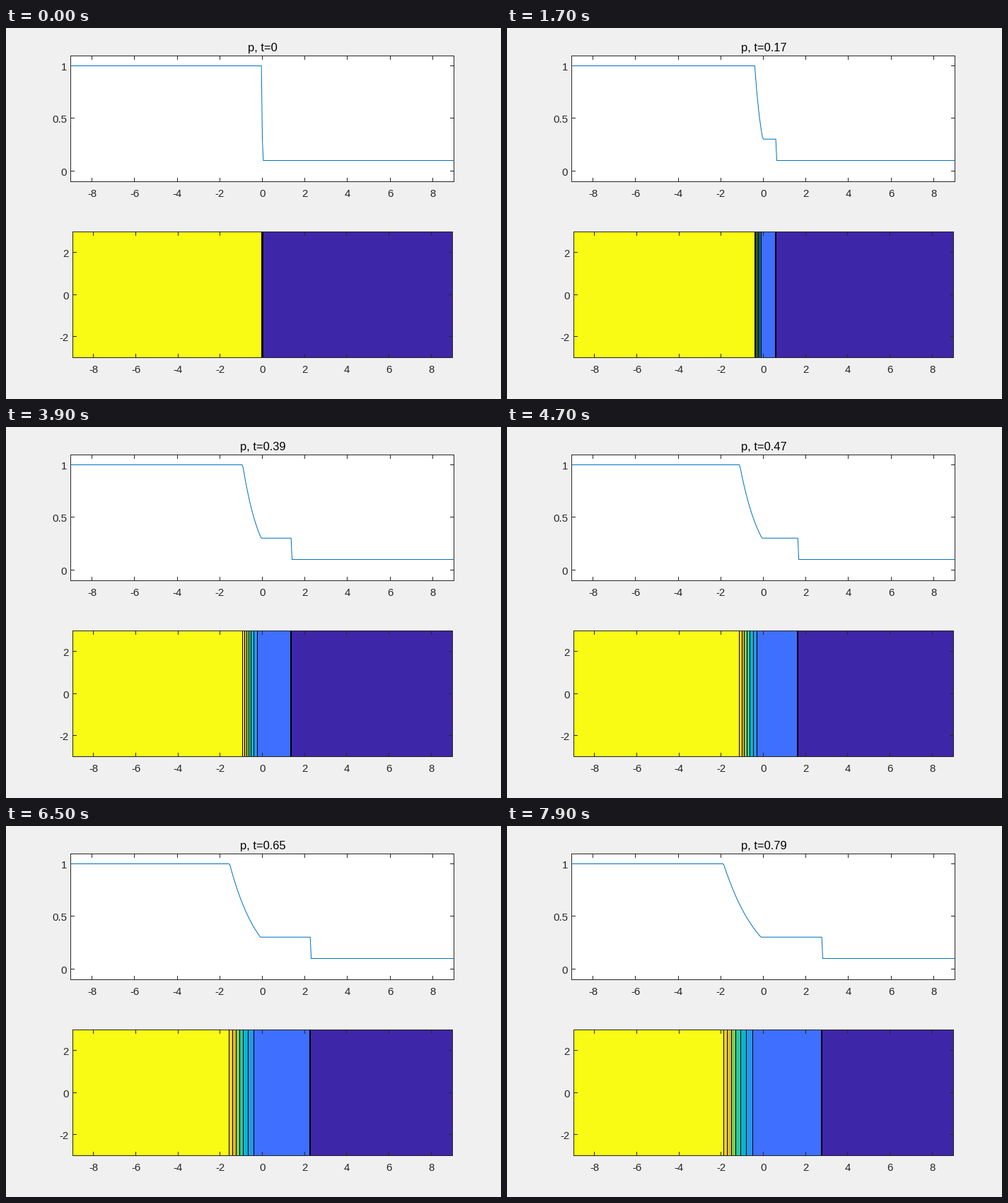
Animation, 700 px wide and 525 px high, one loop 8 s. Source, as a matplotlib script:

```python
import numpy as np
import matplotlib.pyplot as plt
from matplotlib.animation import FuncAnimation
from matplotlib.patches import Rectangle

W, H, DPI = 700, 525, 100
PX = 72 / DPI                      # one pixel in points
INK = (0.15, 0.15, 0.15)
MID = 362.5                        # pixel column of x = 0
TOP = (91.5, 39.5, 633.5, 217.5)   # left, top, right, bottom
LOW = (94.5, 288.5, 631.5, 466.5)
KX_TOP, KX_LOW = 30.11, 29.85      # pixels per unit of x

# Shock tube, gamma = 1.4: states, star pressure and wave speeds
P_STAR, P_RIGHT = 0.30313, 0.1
C_LEFT, TAIL, SHOCK = 1.18322, -0.07027, 1.75216
STRETCH = 2

PARULA = [
    (.2422, .1504, .6603), (.2803, .2782, .9221), (.2440, .4358, .9988),
    (.1540, .5902, .9218), (.0297, .7082, .8163), (.1938, .7758, .6251),
    (.5044, .7993, .3480), (.8634, .7406, .1596), (.9892, .8136, .1885),
    (.9769, .9839, .0805),
]
LEVELS = np.arange(2, 11) / 10
grid = np.arange(-200, 201) * 0.045


def pressure(t):
    xi = grid / (STRETCH * max(t, 1e-9))
    fan = (1 - (1 + np.clip(xi, -C_LEFT, TAIL) / C_LEFT) / 6) ** 7
    p = np.where(xi < TAIL, fan, P_STAR)
    p[xi <= -C_LEFT] = 1
    p[xi > SHOCK] = P_RIGHT
    return p


def top_y(p):
    return 53.5 + 148.9 * (1 - p)


def low_y(y):
    return 377.2 - 29.75 * y


def crisp(v):
    """Centre of the pixel that holds v."""
    return np.floor(v) + 0.5


fig = plt.figure(figsize=(W / DPI, H / DPI), dpi=DPI, facecolor=(240 / 255,) * 3)
ax = fig.add_axes([0, 0, 1, 1])
ax.set_xlim(0, W)
ax.set_ylim(H, 0)
ax.axis("off")


def label(x, y, s, size=15, color=INK, ha="center"):
    return ax.text(x, y, s, fontsize=size * PX, color=color, ha=ha,
                   va="baseline", family="Liberation Sans")


def stroke(xs, ys, color=INK, z=5):
    return ax.plot(xs, ys, color=color, lw=PX, zorder=z, snap=False,
                   solid_capstyle="butt")[0]


def fill(box, color, z):
    x0, y0, x1, y1 = box
    return ax.add_patch(Rectangle((x0, y0), x1 - x0, y1 - y0, fc=color,
                                  lw=0, zorder=z))


def frame(box, kx, ymap, yticks, label_x, tick=5.5):
    x0, y0, x1, y1 = box
    for y in (y0, y1):
        stroke([x0 - .5, x1 + .5], [y, y])
    for x in (x0, x1):
        stroke([x, x], [y0, y1])
    for v in range(-8, 9, 2):
        x = MID + kx * v
        col = crisp(x)
        stroke([col, col], [y0, y0 + tick])
        stroke([col, col], [y1, y1 - tick])
        label(x + .2, y1 + 21.5, str(v))
    for v in yticks:
        y = ymap(v)
        row = crisp(y)
        stroke([x0, x0 + tick], [row, row])
        stroke([x1, x1 - tick], [row, row])
        label(label_x, y + 6.4, f"{v:g}", ha="right")


fill(TOP, "white", 1)
frame(TOP, KX_TOP, top_y, (0, 0.5, 1), 86)
frame(LOW, KX_LOW, low_y, (-2, 0, 2), 88.7)
title = label(363.1, 33, "", size=16.5, color="black")
curve = stroke(MID + KX_TOP * grid, grid * 0, (0, 114 / 255, 189 / 255), z=6)

# Nested bands: each covers the region at or above its level
fill(LOW, PARULA[0], 1)
bands = [fill(LOW, c, 2 + i / 20) for i, c in enumerate(PARULA[1:])]
edges = [stroke([0, 0], [LOW[1], LOW[3]], "black", z=4) for _ in LEVELS]


def update(i):
    t = i / 100
    p = pressure(t)
    title.set_text(f"p, t={t:g}")
    curve.set_ydata(top_y(p))
    cuts = np.interp(LEVELS - 1e-9, p[::-1], grid[::-1])
    for cut, band, edge in zip(MID + KX_LOW * cuts, bands, edges):
        band.set_width(cut - LOW[0])
        edge.set_xdata([crisp(cut)] * 2)
    return [title, curve, *bands, *edges]


anim = FuncAnimation(fig, update, frames=80, interval=100, repeat=True,
                     repeat_delay=0, blit=False)
plt.show()
```
